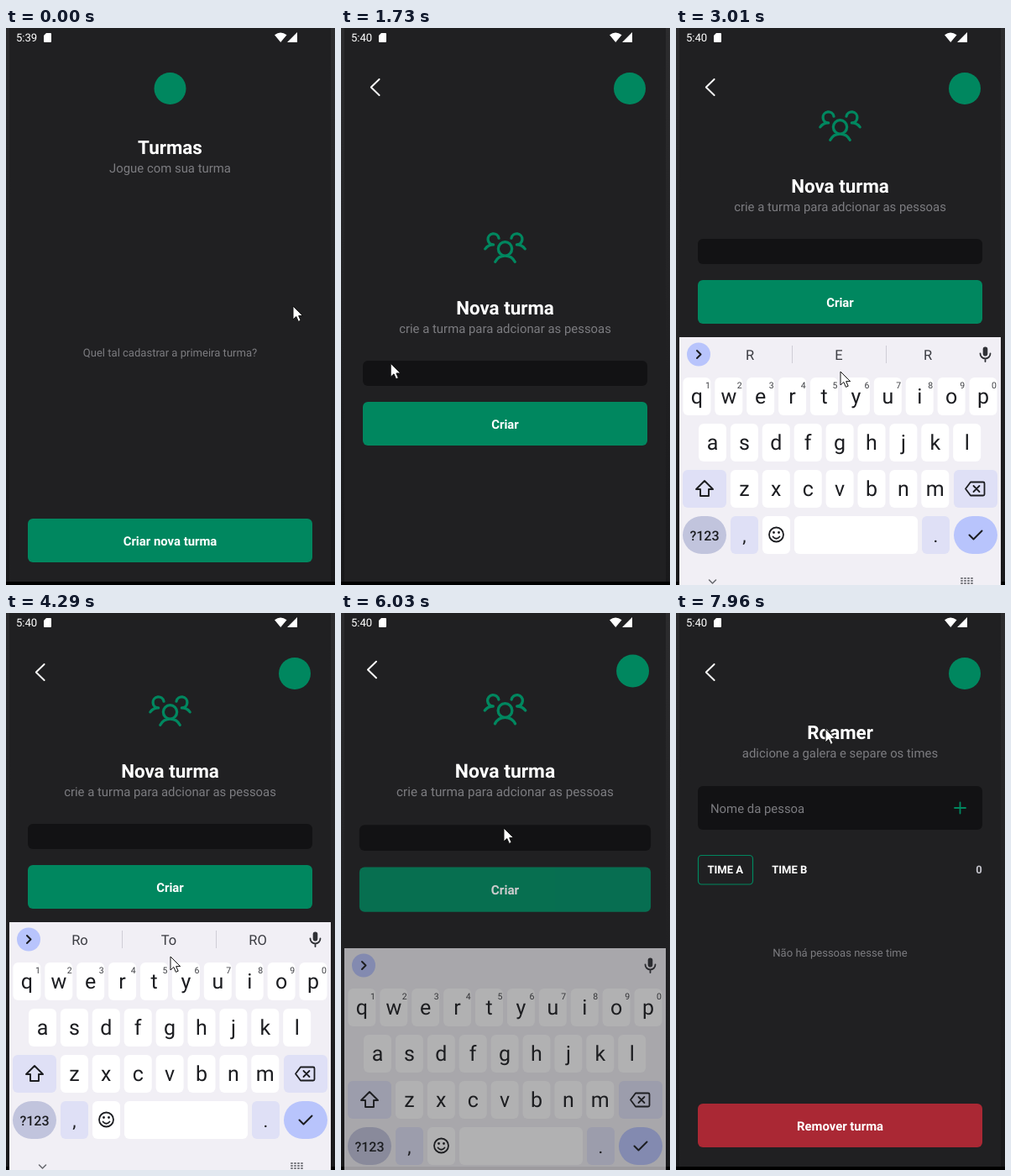
An HTML page for the animation above (8 s loop, 392 px wide and 663 px high).

```html
<!DOCTYPE html>
<html lang="pt-BR">
<head>
<meta charset="utf-8">
<title>Turmas</title>
<style>
html, body { margin: 0; width: 100%; height: 100%; overflow: hidden; background: #202022; }
svg { display: block; width: 392px; height: 663px; font-family: Roboto, sans-serif; text-rendering: geometricPrecision; }
</style>
</head>
<body>
<svg id="stage" viewBox="0 0 392 663"></svg>
<script>
const LOOP = 8000, MID = 195.5;
const BG = '#202022', DARK = '#121214', GREEN = '#00875f', RED = '#aa2834', GRAY = '#7c7c80';
const INK = '#1c1d21', LILAC = '#dfe0f6', BLUE = '#b8c4fc';

// ---- drawing helpers ----
const text = (x, y, size, str, fill = '#fff', extra = '') =>
  `<text x="${x}" y="${y}" font-size="${size}" fill="${fill}" text-anchor="middle" ${extra}>${str}</text>`;
const bold = (x, y, size, str, fill, extra = '') => text(x, y, size, str, fill, 'font-weight="700" ' + extra);
const rect = (x, y, w, h, fill, r = 0, extra = '') =>
  `<rect x="${x}" y="${y}" width="${w}" height="${h}" rx="${r}" fill="${fill}" ${extra}/>`;
const line = (d, color, w, extra = '') =>
  `<path d="${d}" fill="none" stroke="${color}" stroke-width="${w}" stroke-linecap="round" stroke-linejoin="round" ${extra}/>`;
const group = (id, body, extra = '') => `<g id="${id}" ${extra}>${body}</g>`;
const badge = x => `<circle cx="${x}" cy="72" r="19" fill="${GREEN}"/>`;
const button = (id, y, label, fill) =>
  group(id, rect(26, y, 339, 52, fill, 6) + bold(MID, y + 32, 14.9, label));
const heading = (y, title, sub) =>
  bold(MID, y, 22.4, title) + text(MID, y + 22.2, 14.9, sub, GRAY);
const back = line('M45.6 61L35.8 70.5L45.6 80', '#fff', 1.9);
const page = (id, body) => group(id, rect(4, 24, 383, 635, BG) + body);

// ---- the three screens ----
const people = line(
  'M196 116a59.8 59.8 0 0 1 48 24M12 140a59.8 59.8 0 0 1 48-24M70.4 216a64.1 64.1 0 0 1 115.2 0' +
  'M60 116A32 32 0 1 1 91.4 78M164.6 78A32 32 0 1 1 196 116M88 140a40 40 0 1 0 80 0a40 40 0 1 0-80 0',
  GREEN, 16, 'transform="translate(169.4 89.3) scale(.204)"');

const home = page('home', badge(MID) + heading(149.8, 'Turmas', 'Jogue com sua turma') +
  text(MID, 391, 13.05, 'Quel tal cadastrar a primeira turma?', GRAY) +
  button('openBtn', 584, 'Criar nova turma', GREEN));

const create = page('create', back + badge(344) + group('form', people +
  heading(195.6, 'Nova turma', 'crie a turma para adcionar as pessoas') +
  rect(26, 251, 339, 30, DARK, 6) + button('createBtn', 300, 'Criar', GREEN)));

const team = page('team', back + badge(344) +
  heading(149.8, 'Roamer', 'adicione a galera e separe os times') +
  rect(26, 206, 339, 52, DARK, 6) +
  text(41, 237.7, 14.9, 'Nome da pessoa', GRAY, 'style="text-anchor:start"') +
  line('M332 232H345M338.5 225.5V238.5', GREEN, 1.8) +
  rect(26.5, 288.5, 65, 34.5, 'none', 4, `stroke="${GREEN}" stroke-width="1.2"`) +
  bold(58.8, 310.2, 13.05, 'TIME A') + bold(135.3, 310.2, 13.05, 'TIME B') +
  bold(361, 310.2, 13.05, '0', '#c4c4cc') +
  text(MID, 409, 13.05, 'Não há pessoas nesse time', GRAY) +
  button('removeBtn', 584, 'Remover turma', RED));

// ---- keyboard ----
const rows = [['qwertyuiop', 24.9, 416], ['asdfghjkl', 43.5, 471], ['zxcvbnm', 81.4, 526]];
const keys = rows.map(([chars, x0, y]) => [...chars].map((c, i) => {
  const x = x0 + i * 37.9;
  const digit = y === 416 ? text(x + 13, 428.7, 10.5, (i + 1) % 10, '#3c3d42') : '';
  return rect(x - 16.5, y, 33, 45, '#fff', 6) + text(x, y + 31.3, 25, c, INK, 'class="key"') + digit;
}).join('')).join('');

const dot = (x, y, r, fill) => `<circle cx="${x}" cy="${y}" r="${r}" fill="${fill}"/>`;
const ICON = '#303136';
const gear = `<circle cx="244" cy="389" r="4.9" fill="none" stroke="${ICON}" stroke-width="4"/>` +
  `<circle cx="244" cy="389" r="7.6" fill="none" stroke="${ICON}" stroke-width="2.4" stroke-dasharray="3.98 3.98"/>`;
const tools = group('tools',
  line('M72 381H84Q86 381 86 383V391L80 397H72Q70 397 70 395V383Q70 381 72 381M86 391H82Q80 391 80 393V397M74 389Q78 394 82 388', ICON, 1.8) +
  dot(75.5, 385.5, 1.3, ICON) + dot(81, 385.5, 1.3, ICON) +
  text(134, 393.7, 13.2, 'GIF', ICON, 'font-weight="900" letter-spacing="1"') +
  line('M183 381H195Q196 381 196 382V396Q196 397 195 397H183Q182 397 182 396V382Q182 381 183 381', ICON, 1.8) +
  rect(185.5, 379, 7, 5, ICON, 1.5) + line('M185.5 387H192.5M185.5 390H192.5M185.5 393H190', ICON, 1.3) +
  gear + rect(278, 379, 1, 20, '#d5d5dc') +
  [306, 312, 318].map(x => dot(x, 389, 2, ICON)).join(''));
const words = group('words', rect(138, 378, 1, 21, '#cfced6') + rect(250, 378, 1, 21, '#cfced6') +
  [88, 194, 300].map(x => text(x, 395, 16.5, '', '#3c3d43', 'class="word"')).join(''));
const mic = rect(365.7, 379.5, 5.6, 11, ICON, 2.8) +
  line('M362.5 387.5a6 6 0 0 0 12 0M368.5 394V397', ICON, 1.8);
const face = `<circle cx="119.5" cy="603" r="8.5" fill="none" stroke="${INK}" stroke-width="1.8"/>` +
  dot(116.5, 600.5, 1.4, INK) + dot(122.5, 600.5, 1.4, INK) + line('M115.5 605.5Q119.5 610 123.5 605.5', INK, 1.8);

const keyboard = group('keyboard',
  rect(4, 368, 383, 295, '#f1eff5') + dot(27, 388.5, 14, BLUE) +
  line('', INK, 2, 'id="chev"') + mic + tools + words + keys +
  rect(8, 526, 52, 45, LILAC, 6) + rect(331, 526, 52, 45, LILAC, 6) +
  line('M34 539L44 549H39V557H29V549H24Z', INK, 1.9, 'id="shift"') +
  line('M351 540.5H366Q367.5 540.5 367.5 542V555Q367.5 556.5 366 556.5H351L345 548.5ZM354.5 545L361.5 552M361.5 545L354.5 552', INK, 1.8) +
  rect(8, 581, 52, 45, '#c1c4dd', 22.5) + text(34, 609.5, 16, '?123', INK, 'font-weight="500"') +
  rect(65, 581, 33, 45, LILAC, 6) + text(81.5, 612, 22, ',', INK) +
  rect(103, 581, 33, 45, '#fff', 6) + face + rect(141, 581, 147, 45, '#fff', 6) +
  rect(293, 581, 33, 45, LILAC, 6) + text(309.5, 612, 22, '.', INK) +
  rect(331, 581, 52, 45, BLUE, 22.5) + line('M349.5 603.5L354.5 608.5L364.5 598.5', INK, 2) +
  line('M39.5 657L43.5 661L47.5 657', '#66676d', 1.5) +
  [655, 658, 661].map(y => line(`M340 ${y}H354`, '#77787e', 2, 'stroke-dasharray="1 3"')).join(''));

// ---- frame around the screens ----
const status = text(24.5, 16.4, 13.1, '5:39', '#fff', 'id="clock"') +
  '<path d="M48 6H53Q54 6 54 7V16Q54 17 53 17H46Q45 17 45 16V9Z" fill="#fff"/>' +
  '<path d="M320 8.3Q327 2.8 334.5 8.3L327.2 17ZM335 17L347 5V17Z" fill="#fff"/>';
const arrow = '<path id="cursor" d="M0 0V16L3.8 12.5L6.4 18.4L9.2 17.2L6.7 11.6H11.7Z" fill="#fff" stroke="#111" stroke-width="1" stroke-linejoin="round"/>';

document.getElementById('stage').innerHTML =
  '<defs><clipPath id="screen"><rect x="4" y="24" width="383" height="635"/></clipPath>' +
  '<linearGradient id="edge" x2="0" y2="1"><stop stop-color="#2c2c2e"/><stop offset=".5" stop-color="#222224"/>' +
  '<stop offset="1" stop-color="#19191b"/></linearGradient></defs>' +
  rect(0, 0, 392, 663, 'url(#edge)') + rect(4, 0, 383, 663, BG) +
  group('pages', home + create + team, 'clip-path="url(#screen)"') + status +
  rect(4, 368, 383, 291, '#fff', 0, 'id="blank"') + rect(0, 659, 392, 4, '#000') + keyboard + arrow;

const el = id => document.getElementById(id);
const keyTexts = [...document.querySelectorAll('.key')];
const wordTexts = [...document.querySelectorAll('.word')];

// ---- timing ----
// spans in which the picture moves; it rests in between
const spans = [[70, 70], [250, 990], [1060, 1800], [1880, 2200], [2460, 2670], [5420, 5820], [5960, 6360], [7090, 7890], [7960, 7960]];
function snap(t) {
  let out = 0;
  for (const [a, b] of spans) {
    if (t < a) break;
    const step = (b - a) / Math.max(1, Math.round((b - a) / 67)) || 1;
    out = Math.min(b, a + Math.floor((t - a + 5) / step) * step);
  }
  return Math.round(out / 10) * 10;
}

// linear interpolation through [time, ...values]
function track(pts, t) {
  if (t <= pts[0][0]) return pts[0].slice(1);
  for (let i = 1; i < pts.length; i++) {
    const p = pts[i - 1], q = pts[i];
    if (t <= q[0]) return p.slice(1).map((v, k) => v + (q[k + 1] - v) * (t - p[0]) / (q[0] - p[0]));
  }
  return pts[pts.length - 1].slice(1);
}

const cubic = (a, b, c, d, s) => {
  const r = 1 - s;
  return r * r * r * a + 3 * r * r * s * b + 3 * r * s * s * c + s * s * s * d;
};
// fast start with a very long settle
function ease(p) {
  if (p <= 0) return 0;
  if (p >= 1) return 1;
  const [xs, ys] = p < 1 / 6
    ? [[0, .05, .1333, 1 / 6], [0, 0, .06, .4]]
    : [[1 / 6, .2083, .25, 1], [.4, .82, 1, 1]];
  let lo = 0, hi = 1;
  for (let i = 0; i < 24; i++) {
    const m = (lo + hi) / 2;
    if (cubic(...xs, m) < p) lo = m; else hi = m;
  }
  return cubic(...ys, lo);
}

const path = [
  [0, 342, 331], [70, 338, 317], [250, 342, 340], [420, 360, 410], [560, 364, 470], [760, 350, 560],
  [990, 305, 602], [1130, 290, 590], [1260, 278, 573], [1450, 200, 500], [1650, 80, 410], [1800, 41, 390],
  [1880, 48, 388], [2040, 140, 398], [2200, 196, 409], [5360, 196, 409], [5620, 197, 360], [5820, 198, 322],
  [5960, 196, 300], [6030, 194, 256], [6200, 185, 205], [6360, 178, 175], [7040, 178, 175], [7090, 178, 182],
  [7290, 170, 216], [7500, 159, 190], [7700, 186, 150], [7800, 175, 124], [7890, 165, 136], [7960, 178, 138]];
const openPress = [[1050, 1], [1200, .2], [1260, .37], [1450, 1]];
const createPress = [[5750, 1], [5860, .3], [6030, .77], [6110, 1]];
const rise = [[2460, 133, .5], [2530, 58, .78], [2600, 16, .94], [2670, 0, 1], [5960, 0, 1], [6030, 31, .65], [6100, 62, .28], [6160, 90, 0]];
const typing = [[3010, 'R', 'E'], [4290, 'Ro', 'To'], [4420, 'Roa', 'Toa'], [4620, 'Roam', 'Toam'], [4750, 'Roame', 'Roamed'], [5020, 'Roamer', 'Roamers']];
const OPEN = 1196, NEXT = 5974, SLIDE = 450;

const show = (id, on) => el(id).setAttribute('display', on ? 'inline' : 'none');
const fade = (id, a) => el(id).setAttribute('opacity', a);
const zoom = (id, s, cy) =>
  el(id).setAttribute('transform', `translate(${MID} ${cy}) scale(${s}) translate(${-MID} ${-cy})`);
const clamp = v => Math.max(0, Math.min(1, v));

function draw(now) {
  const t = snap(now);
  const open = ease((t - OPEN) / SLIDE), next = ease((t - NEXT) / SLIDE);
  const typed = now >= 2460;

  show('home', t < OPEN + SLIDE);
  zoom('home', 1 + .15 * open, 341);
  fade('openBtn', track(openPress, t)[0]);

  show('create', t >= OPEN && t < 6350);
  fade('create', clamp((t - OPEN - 70) / 70));
  zoom('create', t < NEXT ? .85 + .15 * open : 1 + .15 * next, t < NEXT ? 341 : 196);
  el('form').setAttribute('transform', `translate(0 ${typed ? 0 : 145})`);
  fade('createBtn', track(createPress, t)[0]);

  show('team', t >= NEXT);
  fade('team', clamp((t - NEXT - 60) / 70));
  zoom('team', t >= 6350 ? 1 : .85 + .15 * next, 341);

  el('clock').textContent = now < 600 ? '5:39' : '5:40';

  const [drop, alpha] = track(rise, t);
  show('keyboard', typed && alpha > 0);
  show('blank', typed && now < 2670);
  fade('keyboard', alpha);
  el('keyboard').setAttribute('transform', `translate(0 ${drop})`);

  const upper = now < 2870, hints = now >= 3010;
  keyTexts.forEach(k => {
    const c = k.textContent;
    k.textContent = upper ? c.toUpperCase() : c.toLowerCase();
  });
  el('shift').setAttribute('fill', upper ? INK : 'none');
  el('chev').setAttribute('d', hints ? 'M25 384L29.5 388.5L25 393' : 'M29 384L24.5 388.5L29 393');
  show('tools', !hints);
  show('words', hints && now < 5960);
  const cur = typing.filter(w => now >= w[0]).pop();
  if (cur) [cur[1], cur[2], cur[1].toUpperCase()].forEach((w, i) => { wordTexts[i].textContent = w; });

  const [x, y] = track(path, t);
  el('cursor').setAttribute('transform', `translate(${x} ${y})`);
}

const start = performance.now();
function tick() {
  draw((performance.now() - start) % LOOP);
  requestAnimationFrame(tick);
}
tick();
</script>
</body>
</html>
```
